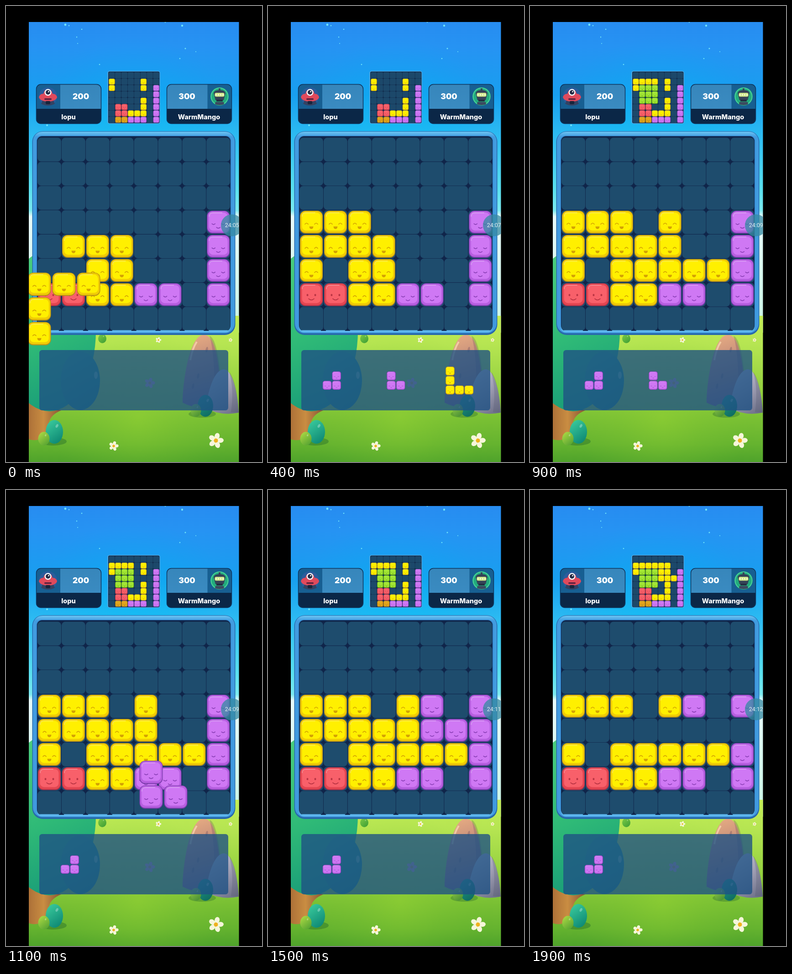
These frames come from a looping animation (561x998 px, 2000 ms). An HTML page with a canvas:

```html
<!DOCTYPE html>
<html lang="en">
<head>
<meta charset="utf-8">
<title>Block puzzle duel</title>
<style>
html, body { margin: 0; width: 100%; height: 100%; overflow: hidden; background: #000; }
canvas { display: block; width: 561px; height: 998px; }
</style>
</head>
<body>
<canvas id="stage" width="561" height="998"></canvas>
<script>
const c = document.getElementById('stage').getContext('2d');
const STEP = 100, STEPS = 20, PITCH = 52.9;

const SKIN = {
  y: { edge: '#b98f16', body: '#f0cc06', core: '#fff000', face: '#d3a204' },
  p: { edge: '#7a3cab', body: '#b75fe0', core: '#cf78f4', face: '#8c40b8' },
  r: { edge: '#b03148', body: '#e44651', core: '#f8606a', face: '#b93443' },
  g: { edge: '#5a9a14', body: '#80cc1a', core: '#a2e634', face: '#5f9f14' },
  o: { edge: '#98680f', body: '#cf920f', core: '#e2a61c', face: '#a06f0f' }
};

const J = [[0, 0], [1, 0], [2, 0], [0, 1], [0, 2]];
const L = [[0, 0], [0, 1], [0, 2], [1, 2], [2, 2]];
const CORNER = [[0, 0], [0, 1], [1, 1]];
const HOOK = [[1, 0], [0, 1], [1, 1]];

// path: [step, x, y] of the first tile; home: board cell
const MOVES = [
  { cells: J, skin: 'y', home: [0, 3], ghost: 1, drop: 3, path: [[0, 73, 609], [1, 82, 537], [2, 89.7, 471.3]] },
  { cells: L, skin: 'y', home: [4, 3], ghost: 8, drop: 9, path: [[6, 372, 682], [7, 358, 598], [8, 314, 486]] },
  { cells: CORNER, skin: 'p', home: [5, 3], ghost: 12, drop: 14, path: [[11, 318, 618], [12, 344.5, 496.5], [13, 354, 477]] }
];

const START = ['', '', '', '.......p', '.yyy...p', '..yy...p', 'rryypp.p'];
const RIVAL = ['', 'y....y', 'y....y.p', '.......p', '.....y.p', '.rr..y.p', '.rryyy.p', '.ooppp.p'];

function rr(x, y, w, h, r, fill) {
  c.beginPath();
  c.roundRect(x, y, w, h, r);
  c.fillStyle = fill;
  c.fill();
}

function oval(x, y, rx, ry, fill, turn = 0) {
  c.beginPath();
  c.ellipse(x, y, rx, ry, turn, 0, Math.PI * 2);
  c.fillStyle = fill;
  c.fill();
}

function shape(d, fill) {
  c.fillStyle = fill;
  c.fill(new Path2D(d));
}

function line(d, color, width) {
  c.strokeStyle = color;
  c.lineWidth = width;
  c.stroke(new Path2D(d));
}

function fade(x0, y0, x1, y1, ...stops) {
  const g = c.createLinearGradient(x0, y0, x1, y1);
  stops.forEach((s, i) => Array.isArray(s) ? g.addColorStop(s[0], s[1]) : g.addColorStop(i / (stops.length - 1), s));
  return g;
}

function glow(x, y, r, ...stops) {
  const g = c.createRadialGradient(x, y, 0, x, y, r);
  stops.forEach((s, i) => g.addColorStop(i / (stops.length - 1), s));
  return g;
}

function label(text, x, y, font, color = '#fff') {
  c.font = font;
  c.textAlign = 'center';
  c.fillStyle = color;
  c.fillText(text, x, y);
}

function tile(x, y, kind, size = 50, ghost = false) {
  const s = SKIN[kind];
  c.save();
  c.translate(x, y);
  c.scale(size / 50, size / 50);
  c.lineCap = 'round';
  rr(-25, -25, 50, 50, 12, s.edge);
  rr(-23.8, -24, 47.6, 47, 11, s.body);
  rr(-20.5, -21, 41, 39.5, 9, s.core);
  if (ghost) {
    rr(-25, -25, 50, 50, 12, 'rgba(27,58,100,.5)');
    c.restore();
    return;
  }
  line('M-20 -13Q-20 -20.5 -13 -20.5H8', 'rgba(255,255,255,.32)', 1.8);
  if (kind === 'r') {
    oval(-8.5, 1, 2, 2.4, s.face);
    oval(8.5, 1, 2, 2.4, s.face);
    line('M-6 9Q0 14.5 6 9', s.face, 1.7);
  } else if (kind === 'p') {
    line('M-14 3.5Q-10.5 7 -7 3.5M7 3.5Q10.5 7 14 3.5M-4 11.5Q0 15 4 11.5', s.face, 1.7);
  } else {
    line('M-14 4.5Q-10.5 0 -7 4.5M7 4.5Q10.5 0 14 4.5', s.face, 1.7);
    shape('M-4.5 9.5H4.5Q4 15 0 15Q-4 15 -4.5 9.5Z', s.face);
  }
  c.restore();
}

function flower(x, y, r, petal = '#f6f6da', heart = '#efb11d') {
  for (let i = 0; i < 5; i++) {
    const a = i * Math.PI * 0.4 - 1.3;
    oval(x + Math.cos(a) * r * 0.62, y + Math.sin(a) * r * 0.62, r * 0.44, r * 0.34, petal, a);
  }
  oval(x, y, r * 0.28, r * 0.28, heart);
}

function egg(x, y, rx, ry, light, dark) {
  oval(x, y, rx, ry, fade(x - rx, y - ry, x + rx, y + ry, light, dark));
  oval(x + rx * 0.3, y - ry * 0.5, rx * 0.14, ry * 0.16, 'rgba(255,255,255,.3)', 0.5);
}

function scenery() {
  c.fillStyle = fade(0, 35, 0, 700, '#278cf0', [0.08, '#2693f3'], [0.24, '#189fef'], [0.38, '#2fbdf2'], [0.55, '#59e0ef'], [0.62, '#7beaf0'], [0.64, '#e8fbfa'], [1, '#c9f4e5']);
  c.fillRect(50, 35, 461, 680);
  c.fillStyle = glow(280, 300, 235, 'rgba(0,190,245,.5)', 'rgba(0,185,245,.3)', 'rgba(0,170,245,0)');
  c.fillRect(50, 65, 461, 400);

  const stars = [[130, 41, 2.4], [138, 43, 1.3], [166, 51, 1.3], [386, 43, 2.2], [349, 35, 1.5], [155, 68, 1.2], [393, 93, 1.5], [381, 115, 1.3], [205, 128, 1.3], [157, 82, 1], [416, 100, 1], [90, 261, 2]];
  stars.forEach(([x, y, r]) => oval(x, y, r, r, '#6fe4fa'));

  c.fillStyle = fade(0, 675, 0, 998, '#c4ee55', [0.2, '#b6e552'], [0.55, '#8fce3c'], [0.72, '#78bf33'], [0.88, '#65b32f'], [1, '#4fa32b']);
  c.fillRect(50, 678, 461, 320);
  c.fillStyle = glow(290, 900, 190, 'rgba(150,212,50,.5)', 'rgba(140,205,50,.2)', 'rgba(130,200,50,0)');
  c.fillRect(50, 700, 461, 298);

  shape('M50 855H92Q100 880 121 885Q98 894 94 912Q92 936 84 944Q66 954 50 948Z', fade(50, 0, 115, 0, '#ad7138', '#c98d42', '#8f5e38'));
  oval(95, 711, 102, 176, fade(50, 560, 180, 870, '#48cc7c', '#2fba77', '#179a78'));
  oval(163, 820, 43, 64, fade(130, 760, 200, 880, '#27a582', '#188775'));
  oval(197, 808, 4, 8, 'rgba(190,240,210,.4)');
  egg(211, 728, 9, 10, '#7ccb45', '#3b9c35');

  oval(103, 953, 30, 9, 'rgba(35,105,45,.42)');
  egg(106, 932, 19, 26, '#3dcf9f', '#08806f');
  egg(83, 947, 12.5, 15, '#b2dd45', '#4c9d30');

  shape('M387 868C388 812 404 721 432 720C456 717 468 765 473 878Q420 886 387 868Z', fade(400, 720, 450, 880, '#e8ad83', '#b98377', '#77637c'));
  shape('M446 722C460 726 470 775 473 860L455 876C459 820 456 755 446 722Z', 'rgba(105,75,95,.28)');
  line('M418 735Q408 750 404 775', 'rgba(255,225,185,.65)', 4);
  [[440, 752], [421, 810], [410, 832]].forEach(([x, y]) => oval(x, y, 2.5, 6, 'rgba(90,65,90,.3)', 0.2));
  shape('M438 880C444 832 459 795 478 795C496 797 508 846 510 890Q470 898 438 880Z', fade(450, 800, 505, 890, '#c2c1d2', '#9c9bb0', '#6d7088'));
  shape('M489 800C501 815 508 850 510 890L493 889Q500 838 489 800Z', 'rgba(75,80,105,.25)');
  oval(430, 893, 30, 8, 'rgba(40,105,45,.35)');
  egg(437, 875, 17, 24, '#239d88', '#0c675d');
  egg(416, 885, 11.5, 14, '#95cc47', '#418a32');

  flower(236, 963, 10);
  flower(460, 951, 16);
  flower(334, 731, 6);
  flower(492, 731, 4);
  flower(315, 825, 11, '#c0a0b4', '#c3a35c');
}

function panel(x, avatarX, scoreX, score, name) {
  c.save();
  c.beginPath();
  c.roundRect(x, 171, 142, 87, 10);
  c.clip();
  c.fillStyle = '#175f92';
  c.fillRect(x, 171, 142, 55);
  c.fillStyle = fade(0, 171, 0, 225, '#3786bb', '#3a8bc1');
  c.fillRect(scoreX - 45, 171, 90, 55);
  c.fillStyle = '#0b2747';
  c.fillRect(x, 225, 142, 34);
  c.restore();
  c.beginPath();
  c.roundRect(x + 0.5, 171.5, 142, 86, 10);
  c.strokeStyle = '#0d345d';
  c.lineWidth = 1.5;
  c.stroke();
  label(score, scoreX, 203.5, '900 17.5px Inter, sans-serif');
  label(name, x + 71, 247.5, '800 14.5px Inter, sans-serif');
  oval(avatarX, 198, 20, 20, avatarX < 280 ? '#2a5c9c' : '#22ac7d');
}

function avatars() {
  shape('M80 207H104L107 214Q92 222 77 214Z', '#334263');
  shape('M72 200Q74 192 82 192Q84 182 92 182Q100 182 102 192Q110 192 112 200Q108 209 92 209Q76 209 72 200Z', '#e04a5c');
  oval(92, 189, 7.5, 7.5, '#f6f7fb');
  oval(92, 189, 5, 5, '#242b45');
  oval(93.5, 187.5, 1.4, 1.4, '#fff');
  rr(84, 202, 16, 3.5, 1.7, '#5d2340');
  rr(87, 208, 10, 7, 2, '#19253c');

  c.beginPath();
  c.arc(468, 198, 18.5, 0, Math.PI * 2);
  c.strokeStyle = '#55d6a2';
  c.lineWidth = 1.5;
  c.stroke();
  rr(466, 180, 4, 6, 1, '#39445a');
  shape('M455 191Q456 184 468 184Q480 184 481 191L477 206H459Z', '#354257');
  rr(457.5, 190, 21, 8.5, 3, '#cfe68c');
  [461, 466, 471, 476].forEach(x => oval(x - 0.5, 194.3, 1.4, 1.7, '#f8ffe0'));
  rr(461, 205, 14, 4, 1, '#222f42');
  shape('M459 210H477L478 215Q468 219 458 215Z', '#3c4a60');
}

function eachCell(rows, draw) {
  rows.forEach((row, y) => [...row].forEach((k, x) => { if (SKIN[k]) draw(x, y, k); }));
}

function rivalBoard(n) {
  rr(222, 142, 116, 116, 5, '#4ba7e1');
  rr(224, 143.5, 112.5, 113, 3, '#102849');
  for (let i = 0; i < 64; i++) rr(225 + i % 8 * 13.9, 145 + (i >> 3) * 13.9, 13.4, 13.4, 2, '#1c486a');
  const put = (x, y, k) => tile(232 + x * 13.88, 151.7 + y * 13.9, k, 13.2);
  eachCell(RIVAL, put);
  if (n >= 5) [1, 2, 3].forEach(x => put(x, 1, 'y'));
  if (n >= 9) for (let i = 0; i < 9; i++) put(1 + i % 3, 2 + (i / 3 | 0), 'g');
  if (n >= 18) L.forEach(([x, y]) => put(4 + x, 1 + y, 'y'));
}

const cellX = x => 95 + x * PITCH;
const cellY = y => 314.3 + y * PITCH;

function boardFrame() {
  rr(57.5, 274, 445, 446, 23, '#2869ac');
  rr(59, 275, 442, 441, 21, fade(0, 275, 0, 716, '#6cc4f3', [0.025, '#429ce0'], [1, '#409adf']));
  rr(66.5, 284, 427, 430, 12, fade(0, 284, 0, 714, '#2f7fc4', [0.96, '#3a8fd4'], [1, '#62bcf2']));
  rr(68, 285, 424, 426, 11, '#10254a');
  for (let i = 0; i < 64; i++) {
    rr(cellX(i % 8) - 26, cellY(i >> 3) - 26, 52, 52, 8, '#1e4c6d');
  }
  for (let x = 0; x < 8; x++) rr(cellX(x) - 21, 709.5, 42, 2.5, 1, '#5db6ee');
}

function boardTiles(n) {
  const put = (x, y, k) => {
    const size = y === 4 && n >= 17 ? (n > 17 ? 0 : 25) : 50;
    if (size) tile(cellX(x), cellY(y), k, size);
  };
  eachCell(START, put);
  for (const m of MOVES) {
    if (n >= m.drop) m.cells.forEach(([x, y]) => put(m.home[0] + x, m.home[1] + y, m.skin));
  }
}

function tray(n) {
  rr(73, 753, 414, 132, 6, 'rgba(31,82,132,.79)');
  const put = (cells, kind, x, y) => cells.forEach(([i, j]) => tile(x + i * 20.7, y + j * 20.7, kind, 19.5));
  if (n < 4) return;
  put(HOOK, 'p', 129.5, 809.5);
  if (n < 11) put(CORNER, 'p', 270, 809.5);
  if (n < 6) put(L, 'y', 399, 799);
}

function dragged(n) {
  for (const m of MOVES) {
    const at = m.path.find(p => p[0] === n);
    if (!at) continue;
    if (n >= m.ghost) {
      m.cells.forEach(([x, y]) => tile(cellX(m.home[0] + x), cellY(m.home[1] + y), m.skin, 50, true));
    }
    m.cells.forEach(([x, y]) => tile(at[1] + x * 54, at[2] + y * 54, m.skin, 51));
  }
}

function clock(n) {
  oval(495, 480, 24, 24, 'rgba(55,139,164,.76)');
  const sec = Math.floor(5.8 + n * 0.36);
  label('24:' + String(sec).padStart(2, '0'), 495.3, 484.3, '12.5px Roboto, sans-serif', '#e3eef2');
}

function paint(n) {
  c.fillStyle = '#000';
  c.fillRect(0, 0, 561, 998);
  c.save();
  c.beginPath();
  c.rect(50, 35, 460.5, 963);
  c.clip();
  scenery();
  panel(66, 92, 164, n >= 17 ? 300 : 200, 'lopu');
  panel(352, 468, 396.5, 300, 'WarmMango');
  avatars();
  rivalBoard(n);
  boardFrame();
  boardTiles(n);
  tray(n);
  dragged(n);
  clock(n);
  c.restore();
}

const began = performance.now();
let shown = -1;
function tick() {
  const n = Math.floor((performance.now() - began) / STEP) % STEPS;
  if (n !== shown) paint(shown = n);
  requestAnimationFrame(tick);
}
tick();
</script>
</body>
</html>
```
